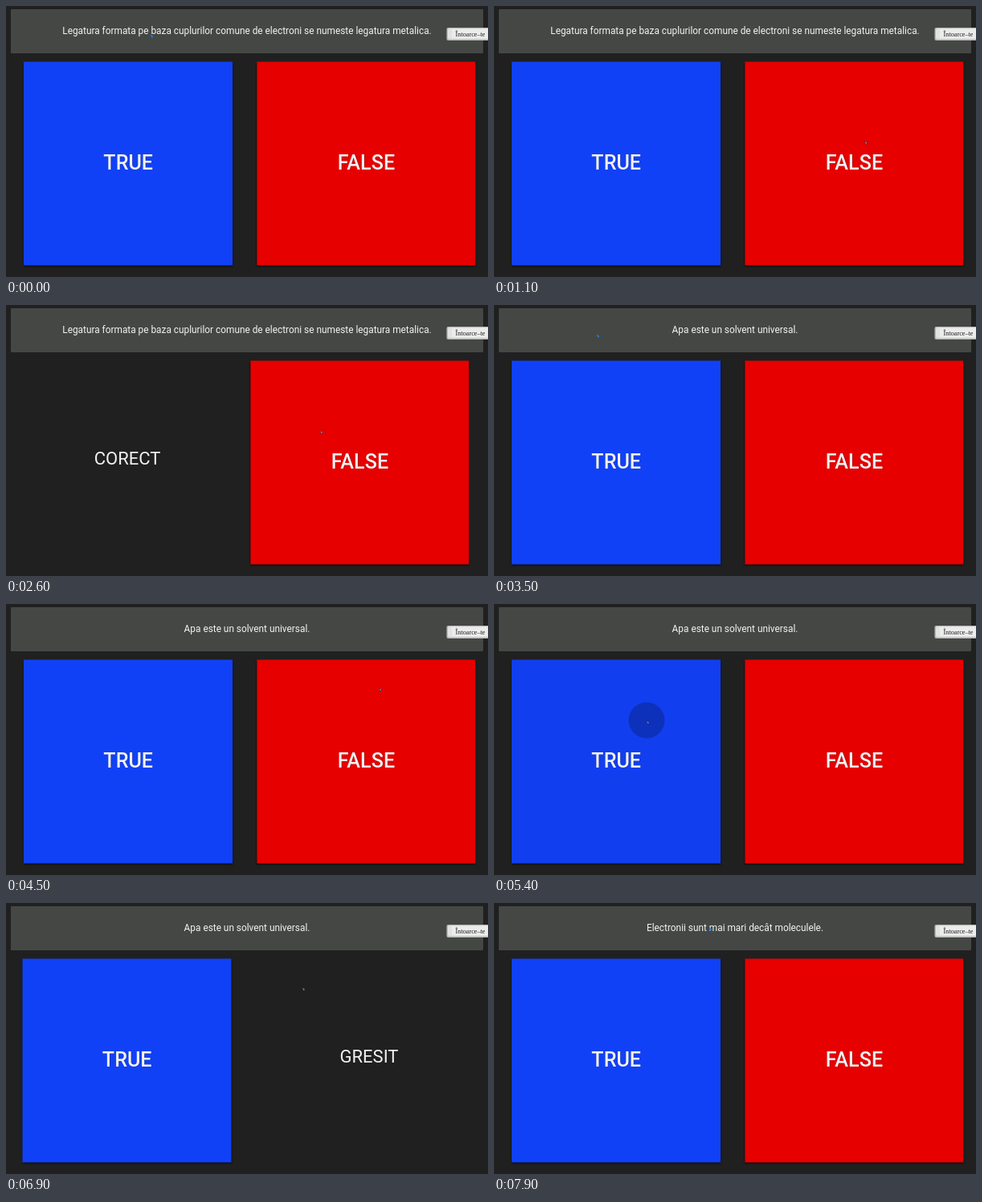
Write an HTML page with a canvas that moves like this. It is 600 px wide and 338 px high and loops after 8000 ms.

```html
<!DOCTYPE html>
<html lang="ro">
<head>
<meta charset="utf-8">
<style>
html, body { margin: 0; width: 100%; height: 100%; overflow: hidden; background: #202021; }
canvas { display: block; width: 600px; height: 338px; }
</style>
</head>
<body>
<canvas width="600" height="338"></canvas>
<script>
const ctx = document.querySelector('canvas').getContext('2d');
const LOOP = 8000, TOP = 69.5, HEIGHT = 254;
const clamp = v => Math.max(0, Math.min(1, v));

const TRUE_CARD = { x: 22, w: 260, color: '#1141f6', label: 'TRUE', dir: -1 };
const FALSE_CARD = { x: 312.4, w: 271.8, color: '#e60000', label: 'FALSE', dir: 1 };

const ROUNDS = [
  { end: 3000, text: 'Legatura formata pe baza cuplurilor comune de electroni se numeste legatura metalica.',
    tap: 1523, x: 391.5, y: 157.5, kept: FALSE_CARD, drift: 8, result: 'CORECT', resultX: 151 },
  { end: 7300, text: 'Apa este un solvent universal.',
    tap: 5357, x: 190, y: 145, kept: TRUE_CARD, drift: 1.5, result: 'GRESIT', resultX: 452 },
  { end: LOOP, text: 'Electronii sunt mai mari decât moleculele.', tap: Infinity }
];

// The pointer rests between curved moves
const HOME = [181, 37];
const MOVES = [
  { start: 100, stop: 1500, bend: [640, 210], to: [392, 158] },
  { start: 2700, stop: 3450, bend: [262, 97], to: [129, 38] },
  { start: 3600, stop: 5300, bend: [770, 110], to: [191, 147] },
  { start: 6300, stop: 7700, bend: [540, 100], to: [269, 32] }
];

function pointerAt(t) {
  return MOVES.reduce((from, { start, stop, bend, to }) => {
    const u = clamp((t - start) / (stop - start)), k = u * u * (3 - 2 * u);
    return from.map((a, i) => (1 - k) ** 2 * a + 2 * k * (1 - k) * bend[i] + k * k * to[i]);
  }, HOME);
}

function write(text, x, y, font, color = '#f2f2f2') {
  ctx.font = font;
  ctx.fillStyle = color;
  ctx.textAlign = 'center';
  ctx.fillText(text, x, y);
}

function box(x, y, w, h, r, color) {
  ctx.fillStyle = color;
  ctx.beginPath();
  ctx.roundRect(x, y, w, h, r);
  ctx.fill();
}

function drawCard(card, shift, round, age) {
  const x = card.x + shift, mid = x + card.w / 2;
  ctx.save();
  ctx.shadowColor = 'rgba(0,0,0,.6)';
  ctx.shadowBlur = 2;
  ctx.shadowOffsetY = 1;
  box(x, TOP, card.w, HEIGHT, 0, card.color);
  ctx.restore();

  if (card === round.kept && age > 0) {
    const fade = clamp((310 - age) / 130);
    ctx.save();
    ctx.beginPath();
    ctx.rect(x, TOP, card.w, HEIGHT);
    ctx.clip();
    ctx.fillStyle = `rgba(0,0,0,${0.07 * clamp(age / 120) * fade})`;
    ctx.fillRect(x, TOP, card.w, HEIGHT);
    ctx.fillStyle = `rgba(0,0,0,${0.225 * fade})`;
    ctx.beginPath();
    ctx.arc(round.x, round.y, age * 0.512, 0, 7);
    ctx.fill();
    ctx.restore();
  }

  const font = '500 25.2px Roboto, sans-serif';
  write(card.label, mid + 0.8, 204.3, font, 'rgba(0,0,0,.3)');
  write(card.label, mid + 0.2, 203.5, font);
}

function drawBadge() {
  box(548.5, 27, 56, 16, 2, '#b9b9b9');
  box(550, 28, 54, 13.5, 2, '#e2e2e2');
  box(555, 29, 49, 11.5, 1, '#ececec');
  write('Întoarce–te', 578, 38, '8.2px "Liberation Serif", serif', '#1c1c1c');
}

function drawPointer(t) {
  const [x, y] = pointerAt(t);
  const overCard = y > TOP;
  ctx.beginPath();
  ctx.moveTo(x - 1, y - 1);
  ctx.lineTo(x + 2, y + 1);
  ctx.lineTo(x + 0.8, y + 2.5);
  ctx.closePath();
  ctx.lineWidth = 1;
  ctx.strokeStyle = overCard ? '#18223f' : '#1a66b8';
  ctx.stroke();
  ctx.fillStyle = overCard ? '#8297c4' : '#2389ee';
  ctx.fill();
}

function draw(t) {
  const round = ROUNDS.find(r => t < r.end);
  const age = t - round.tap;
  const slide = 1e-4 * Math.max(0, age - 100) ** 3;

  ctx.fillStyle = '#202021';
  ctx.fillRect(0, 0, 600, 338);
  box(6, 4, 588, 55, 1, '#454745');
  write(round.text, 300, 35, '11.85px Roboto, sans-serif');

  if (slide > 0) write(round.result, round.resultX, 199, '22px Roboto, sans-serif');
  for (const card of [TRUE_CARD, FALSE_CARD]) {
    const shift = card === round.kept ? -Math.min(round.drift, slide / 48) : card.dir * slide;
    if (Math.abs(shift) < 600) drawCard(card, shift, round, age);
  }
  drawBadge();
  drawPointer(t);
}

const start = performance.now();
function tick() {
  draw((performance.now() - start) % LOOP);
  requestAnimationFrame(tick);
}
tick();
</script>
</body>
</html>
```
